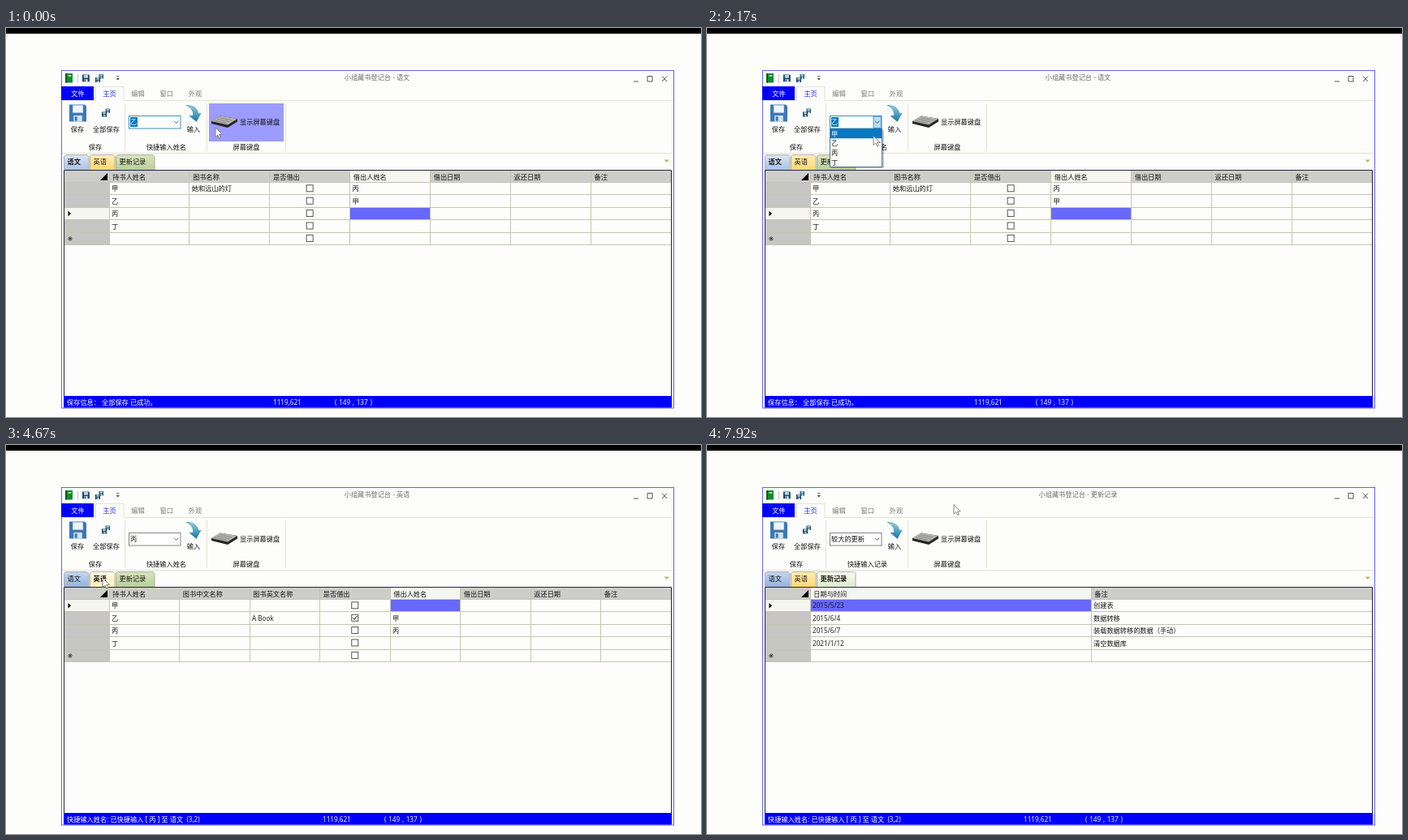
These frames come from a looping animation (856 by 480 pixels, 8 s). An HTML page:

```html
<!DOCTYPE html>
<html lang="zh-CN">
<head>
<meta charset="utf-8">
<style>
  html, body { margin: 0; width: 100%; height: 100%; overflow: hidden; background: #fdfdfc; }
  svg { display: block; width: 856px; height: 480px; fill: #141414; }
  text { font: 8.2px "Open Sans", "Noto Sans CJK SC", "Noto Sans CJK", sans-serif; white-space: pre; }
</style>
</head>
<body>
<script>
const LOOP = 8000, FRAME = 1000 / 12;
const PAPER = '#fdfdfc', BLUE = '#0000fa', INK = '#141414', SELECT = '#6868fa', HOVER = '#9c9cff';
const RULE = '#e4e4d0', GRID = '#c6c6b0', HEAD = '#cdcdca', HEAD_ON = '#f6f6f0', ACCENT = '#0878c0';
const APP = '小组藏书登记台';

const el = (parent, name, attrs = {}) => {
  const node = document.createElementNS('http://www.w3.org/2000/svg', name);
  set(node, attrs);
  parent.append(node);
  return node;
};
const set = (node, attrs) => { for (const k in attrs) node.setAttribute(k, attrs[k]); };
const rect = (p, x, y, width, height, fill, more) => el(p, 'rect', { x, y, width, height, fill, ...more });
const path = (p, d, fill, more) => el(p, 'path', { d, fill, ...more });
const line = (p, d, stroke, width = 1) => path(p, d, 'none', { stroke, 'stroke-width': width });
const text = (p, x, y, str, more) => {
  const node = el(p, 'text', { x, y, ...more });
  node.textContent = str;
  return node;
};
const label = (p, x, y, str, more) => text(p, x, y, str, { 'text-anchor': 'middle', ...more });
const group = (p, more) => el(p, 'g', more);
const show = (node, on) => { node.style.display = on ? '' : 'none'; };

const svg = el(document.body, 'svg', { viewBox: '0 0 856 480' });
const defs = el(svg, 'defs');
const gradient = (id, from, to) => {
  const g = el(defs, 'linearGradient', { id, x2: 0, y2: 1 });
  el(g, 'stop', { offset: 0, 'stop-color': from });
  el(g, 'stop', { offset: 1, 'stop-color': to });
  return `url(#${id})`;
};

// Window frame and title bar
rect(svg, 0, 0, 856, 480, PAPER);
rect(svg, 0, 0, 856, 7, '#000');
rect(svg, 68.5, 52.5, 754, 416.5, PAPER, { stroke: '#6464f0' });
rect(svg, 73, 56, 9, 11.5, '#138a2c');
rect(svg, 73, 56, 2, 11.5, '#075c1a');
rect(svg, 76.5, 58, 4, 2, '#9ada8c');
line(svg, 'M88.5 57V68', '#c8c8c0');

function disk(p, x, y, s, body, plate) {
  const g = group(p, { transform: `translate(${x} ${y}) scale(${s})` });
  path(g, 'M0 0H9L10 1V10H0Z', body);
  rect(g, 2, .4, 6, 4.4, plate);
  rect(g, 2.5, 6.4, 5, 3.6, '#d5e3ee');
  rect(g, 3.2, 7, 1.4, 2.6, body);
}
function disks(x, y) {
  disk(svg, x + 4.5, y, .55, '#1c5878', '#9cc4d0');
  disk(svg, x, y + 4, .6, '#123c58', '#9cc4d0');
}
disk(svg, 94, 57.5, .88, '#164060', '#b9d3e2');
disks(110, 57);
path(svg, 'M135.5 62H140L137.7 64.5Z', '#505050');
line(svg, 'M136 59.5H139.5', '#707070');
const title = label(svg, 457, 63.5, '', { fill: '#6c6c68' });
line(svg, 'M773 66H779M790 59.5H796V66H790ZM808 59.5L814 66M814 59.5L808 66', '#555');

// Ribbon
line(svg, 'M69 89.5H110.5V72.5H145V89.5H822M69 154.5H822', RULE);
rect(svg, 68, 72, 40, 17, BLUE);
label(svg, 88.5, 83.5, '文件', { fill: '#fff' });
label(svg, 127.5, 83.5, '主页', { fill: '#2a2af0' });
['编辑', '窗口', '外观'].forEach((s, i) => label(svg, 162.5 + 35.2 * i, 83.5, s, { fill: '#777774' }));
line(svg, 'M146.5 93V152M247.5 93V152M344.5 93V152', RULE);
const inputHover = rect(svg, 218, 93, 27, 47, HOVER);
const keysHover = rect(svg, 250, 93, 92, 47, HOVER);

disk(svg, 78, 94.5, 2.1, '#3d78b4', '#eef5fa');
disks(118, 99.5);
label(svg, 88, 127.5, '保存');
label(svg, 123.5, 127.5, '全部保存');
label(svg, 231, 127.5, '输入');
text(svg, 288, 119, '显示屏幕键盘');
label(svg, 110, 150, '保存');
const groupName = label(svg, 197.5, 150, '');
label(svg, 296, 150, '屏幕键盘');
path(svg, 'M222 95.5C230 95 236 99 237 106L240 105L234.5 115.5L226 108.5L230.5 108C231 102 228 98 222 95.5Z',
  gradient('arrow', '#8fd0e0', '#1476a4'), { stroke: '#2a7c9c', 'stroke-width': .5 });

path(svg, 'M253 115L264 108.5L285 112V115.5L273 123L253 118Z', '#262626');
path(svg, 'M253 115L264 108.5L285 112L273 119.5Z', '#b4b4b2');
for (let i = 0; i < 3; i++) {
  line(svg, `M${257 + i * 3} ${114.2 - i * 1.8}L${272 + i * 3} ${117.6 - i * 1.8}`, '#787878', .7);
}

// Combo box
const combo = rect(svg, 151.5, 108.5, 63.5, 15.5, '#fff');
const comboButton = rect(svg, 205, 109, 9.5, 14.5, '#b8dcf0', { stroke: ACCENT, 'stroke-width': .7 });
line(svg, 'M207 114.7L209.7 117.5L212.4 114.7', '#505050', .9);
const comboMark = rect(svg, 153, 110, 9, 12, ACCENT);
const comboText = text(svg, 153, 119, '');

// Document tabs
const tabs = [
  { x: 71, w: 31, name: '语文', fill: gradient('t0', '#c4d6ee', '#94b4dc'), on: gradient('t0on', '#dbe6f4', '#a9c3e4') },
  { x: 103, w: 31, name: '英语', fill: gradient('t1', '#ffedb4', '#ffd873'), on: gradient('t1on', '#fffbe6', '#fff0b8') },
  { x: 135, w: 48, name: '更新记录', fill: gradient('t2', '#d8e4bc', '#b8cf98'), on: gradient('t2on', '#fafdf2', '#dde9c6') }
];
for (const t of tabs) {
  t.shape = path(svg, `M${t.x + .5} 175V158.5L${t.x + 2.5} 156.5H${t.x + t.w - 2}L${t.x + t.w} 158.5V175`, t.fill,
    { stroke: '#a0a098', 'stroke-width': .8 });
  t.text = text(svg, t.x + 4.5, 167.5, t.name);
}
path(svg, 'M810.5 162.5H817L813.7 166Z', '#c0b478');

// Tables
const LEFT = 127, RIGHT = 819, TOP = 190.5, ROW = 15.4;
const people = ['甲', '乙', '丙', '丁'];
const views = [
  { heads: ['持书人姓名', '图书名称', '是否借出', '借出人姓名', '借出日期', '返还日期', '备注'],
    cells: [people, ['她和远山的灯'], null, ['丙', '甲']], cur: [3, 2], checked: -1, info: 329 },
  { heads: ['持书人姓名', '图书中文名称', '图书英文名称', '是否借出', '借出人姓名', '借出日期', '返还日期', '备注'],
    cells: [people, [], ['', 'A Book'], null, ['', '甲', '丙']], cur: [4, 0], checked: 1, info: 390 },
  { heads: ['日期与时间', '备注'],
    cells: [['2015/5/23', '2015/6/4', '2015/6/7', '2021/1/12'],
      ['创建表', '数据转移', '装载数据转移的数据（手动）', '清空数据库']], cur: [0, 0], checked: -1, info: 390 }
];

function checkbox(p, x, y, on) {
  rect(p, x - 4, y - 4, 8, 8, '#fff', { stroke: '#444', 'stroke-width': .9 });
  if (on) line(p, `M${x - 2.5} ${y}L${x - .7} ${y + 2}L${x + 2.7} ${y - 2.2}`, INK);
}

function buildTable(v) {
  const g = v.node = group(svg);
  const [col, row] = v.cur, w = (RIGHT - LEFT) / v.heads.length;
  const colX = i => LEFT + w * i, rowY = i => TOP + ROW * i;
  rect(g, 72, 176, 747, 14.5, HEAD);
  rect(g, 72, TOP, 55, ROW * 5, '#c6c6c3');
  rect(g, colX(col), 176, w, 14.5, HEAD_ON);
  rect(g, 72, rowY(row), 55, ROW, HEAD_ON);
  rect(g, colX(col), rowY(row), w, ROW, SELECT);
  let d = '';
  for (let i = 0; i <= 5; i++) d += `M72 ${Math.floor(rowY(i)) + .5}H819`;
  for (let i = 0; i < v.heads.length; i++) d += `M${Math.floor(colX(i)) + .5} 176V267`;
  line(g, d, GRID);
  path(g, 'M125 179V188H116Z', '#000');
  path(g, `M76.5 ${rowY(row) + 4.5}L80 ${rowY(row) + 7.7}L76.5 ${rowY(row) + 11}Z`, '#000');
  line(g, 'M76 260H82M79 257V263M77 258L81 262M81 258L77 262', '#333', .8);
  v.heads.forEach((s, i) => text(g, colX(i) + 4.3, 186.5, s));
  v.cells.forEach((list, c) => {
    for (let r = 0; r < 5; r++) {
      if (!list) checkbox(g, colX(c) + w / 2, rowY(r) + 7.3, r === v.checked);
      else if (list[r]) text(g, colX(c) + 3, rowY(r) + 10.8, list[r]);
    }
  });
  v.entry = text(g, colX(col) + 3, rowY(row) + 10.8, '');
}
views.forEach(buildTable);
line(svg, 'M71.5 454V175.5H819.5V454', '#26263c');

// Status bar
rect(svg, 71, 454, 749, 14.5, BLUE);
const status = text(svg, 75, 464.5, '', { fill: '#fff' });
const info = group(svg, { fill: '#fff' });
text(info, 0, 464.5, '1119,621');
text(info, 76, 464.5, '( 149 , 137 )', { 'word-spacing': .6 });

// Drop-down list
const ITEM = 11.7, LIST_Y = 124.5;
const list = group(svg);
rect(list, 153, 126, 65, 47, '#000', { opacity: .22 });
rect(list, 151.5, 124.5, 64, 47, PAPER, { stroke: '#3c6c8c', 'stroke-width': .9 });
const itemMark = rect(list, 152, LIST_Y, 63, ITEM, ACCENT);
const items = people.map((s, i) => text(list, 153, LIST_Y + ITEM * i + 9, s));

const pointer = path(svg, 'M0 0V11.5L2.7 9L4.7 13L6.5 12.1L4.6 8.4H8.2Z', '#fff', { stroke: '#777', 'stroke-width': .9 });

// Pointer path: time, x, y
const track = [
  [0, 258, 123], [250, 257, 123], [1000, 239, 128], [1250, 239, 128], [1700, 210, 117], [1880, 210, 117],
  [2100, 205, 133], [2230, 205, 133], [2600, 190, 152], [2780, 190, 152], [3280, 233, 112], [3920, 233, 112],
  [4340, 119, 164], [4650, 119, 164], [5150, 156, 167], [5600, 157, 166], [6300, 195.5, 125],
  [6750, 195.5, 125], [7700, 304, 73.5], [8000, 304, 73.5]
];
const CLICK = { open: 1830, pick: 2700, enter: 3420, english: 4420, log: 5500 };

function pointerAt(t) {
  const i = Math.max(1, track.findIndex(k => k[0] > t));
  const [t0, x0, y0] = track[i - 1], [t1, x1, y1] = track[i];
  const u = (t - t0) / (t1 - t0), e = u * u * (3 - 2 * u);
  return [x0 + (x1 - x0) * e, y0 + (y1 - y0) * e];
}

function draw(t) {
  const [x, y] = pointerAt(t);
  const inside = (a, b, c, d) => x >= a && x <= b && y >= c && y <= d;
  const active = t < CLICK.english ? 0 : t < CLICK.log ? 1 : 2;
  const open = t >= CLICK.open && t < CLICK.pick;
  const entered = t >= CLICK.enter;
  const focused = active === 0;

  pointer.setAttribute('transform', `translate(${x.toFixed(2)} ${y.toFixed(2)})`);
  show(inputHover, !open && inside(218, 245, 93, 140));
  show(keysHover, inside(250, 342, 93, 140));

  title.textContent = `${APP} - ${tabs[active].name}${entered && focused ? '*' : ''}`;
  groupName.textContent = active === 2 ? '快捷输入记录' : '快捷输入姓名';
  status.textContent = entered ? '快捷输入姓名: 已快捷输入 [ 丙 ] 至 语文  (3,2)' : '保存信息： 全部保存 已成功。';
  info.setAttribute('transform', `translate(${views[active].info} 0)`);

  set(combo, { stroke: focused ? '#3c94b8' : '#858585' });
  show(comboButton, open);
  show(comboMark, focused);
  comboText.textContent = active === 2 ? '较大的更新' : t < CLICK.pick ? '乙' : '丙';
  comboText.style.fill = focused ? '#fff' : INK;

  show(list, open);
  const item = y < LIST_Y ? 1 : Math.min(3, Math.floor((y - LIST_Y) / ITEM));
  itemMark.setAttribute('y', LIST_Y + ITEM * item);
  items.forEach((n, i) => { n.style.fill = i === item ? '#fff' : INK; });

  tabs.forEach((tab, i) => {
    const hover = inside(tab.x, tab.x + tab.w, 156, 174);
    tab.text.style.fontWeight = i === active ? 700 : 400;
    tab.shape.setAttribute('fill', i === active ? tab.on : hover ? '#fff8d4' : tab.fill);
    show(views[i].node, i === active);
  });
  views[0].entry.textContent = entered ? '丙' : '';
}

const start = performance.now();
function tick() {
  const t = (performance.now() - start) % LOOP;
  draw(Math.min(LOOP - 1, Math.floor((t + 4) / FRAME) * FRAME));
  requestAnimationFrame(tick);
}
tick();
</script>
</body>
</html>
```
